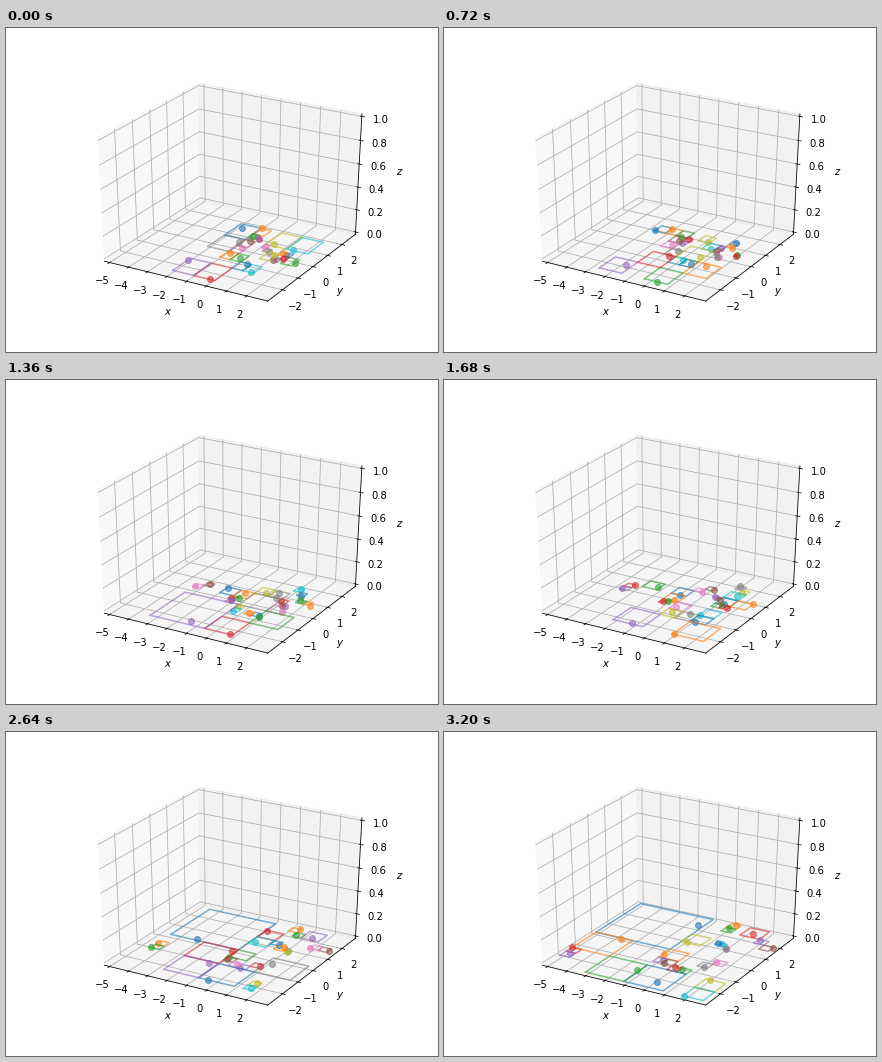
These frames come from a looping animation (432x324 px, 3280 ms). A matplotlib script:

```python
import numpy as np
import matplotlib.pyplot as plt
from matplotlib.animation import FuncAnimation

FRAMES, STEP = 41, 80
W, H = 432, 324
COUNT = 25
PULL = 0.6    # inward share of the start radius lost over one loop
ORBIT = 1.2   # speed of the inner swarm per loop

# Leading bodies: start x, y and velocity per loop
LEADERS = np.array([
    (-2.0, -1.7, 1.0, -1.7),
    (-0.1, -2.6, 2.1, -0.4),
    (1.1, -1.5, 1.5, 2.7),
    (0.3, 0.4, 1.8, -3.0),
    (-0.6, 0.0, 0.3, -1.1),
    (2.3, -0.2, -0.9, 2.6),
    (1.5, 0.2, -2.0, 2.1),
    (1.5, 0.7, -0.5, 2.6),
    (1.6, -0.1, 2.2, 1.8),
    (1.3, 0.3, 0.8, 2.3),
    (-0.9, 1.7, -4.7, -2.1),
    (-1.7, 1.4, -4.1, -2.4),
    (-0.4, 0.9, -3.5, -0.4),
    (-0.8, 1.0, -0.9, -2.3),
])


def make_swarm(n):
    """Random bodies in a disc, all circling the same way."""
    rng = np.random.default_rng(4)
    r = 1.3 * np.sqrt(rng.uniform(0.05, 1, n))
    a = rng.uniform(0, 2 * np.pi, n)
    c, s = np.cos(a), np.sin(a)
    return np.c_[0.2 + r * c, 0.2 + r * s, -ORBIT * s, ORBIT * c]


def positions(i):
    t = i / (FRAMES - 1)
    return bodies[:, :2] * (1 - PULL * t * t) + bodies[:, 2:] * t


def leaves(pts, x0, y0, x1, y1, depth=0):
    """Occupied quadtree leaves, each quadrant visited clockwise."""
    if len(pts) == 0:
        return
    if len(pts) == 1 or depth > 12:
        for p in pts:
            yield p, (x0, y0, x1, y1)
        return
    xm, ym = (x0 + x1) / 2, (y0 + y1) / 2
    right, top = pts[:, 0] >= xm, pts[:, 1] >= ym
    quads = [
        (~right & top, (x0, ym, xm, y1)),
        (right & top, (xm, ym, x1, y1)),
        (right & ~top, (xm, y0, x1, ym)),
        (~right & ~top, (x0, y0, xm, ym)),
    ]
    for mask, cell in quads:
        yield from leaves(pts[mask], *cell, depth + 1)


fig = plt.figure(figsize=(W / 72, H / 72), dpi=72)
ax = fig.add_subplot(projection="3d")
# A unit cube stretched over the whole axes rectangle
ax.apply_aspect = lambda position=None: None
ax.set_box_aspect((1, 1, 1), zoom=0.94675)
ax.view_init(30, -60)
ax.set(xlim=(-5.28, 3.03), ylim=(-2.93, 2.97), zlim=(-1 / 48, 49 / 48),
       xticks=range(-5, 3), yticks=range(-2, 3), zticks=np.linspace(0, 1, 6),
       xlabel="$x$", ylabel="$y$", zlabel="$z$")

bodies = np.vstack([LEADERS, make_swarm(COUNT - len(LEADERS))])
boxes, dots = [], []
for k in range(COUNT):
    style = dict(color=f"C{k % 10}", alpha=0.6)
    boxes += ax.plot([], [], [], lw=1.5, **style)
    dots += ax.plot([], [], [], "o", ms=6, mew=1, **style)


def update(i):
    pts = positions(i)
    root = (*pts.min(axis=0), *pts.max(axis=0))
    for box, dot, (p, cell) in zip(boxes, dots, leaves(pts, *root)):
        x0, y0, x1, y1 = cell
        box.set_data_3d([x0, x1, x1, x0, x0], [y0, y0, y1, y1, y0], [0] * 5)
        dot.set_data_3d([p[0]], [p[1]], [0])
    return boxes + dots


anim = FuncAnimation(fig, update, frames=FRAMES, interval=STEP,
                     repeat=True, repeat_delay=0, blit=False)
plt.show()
```
